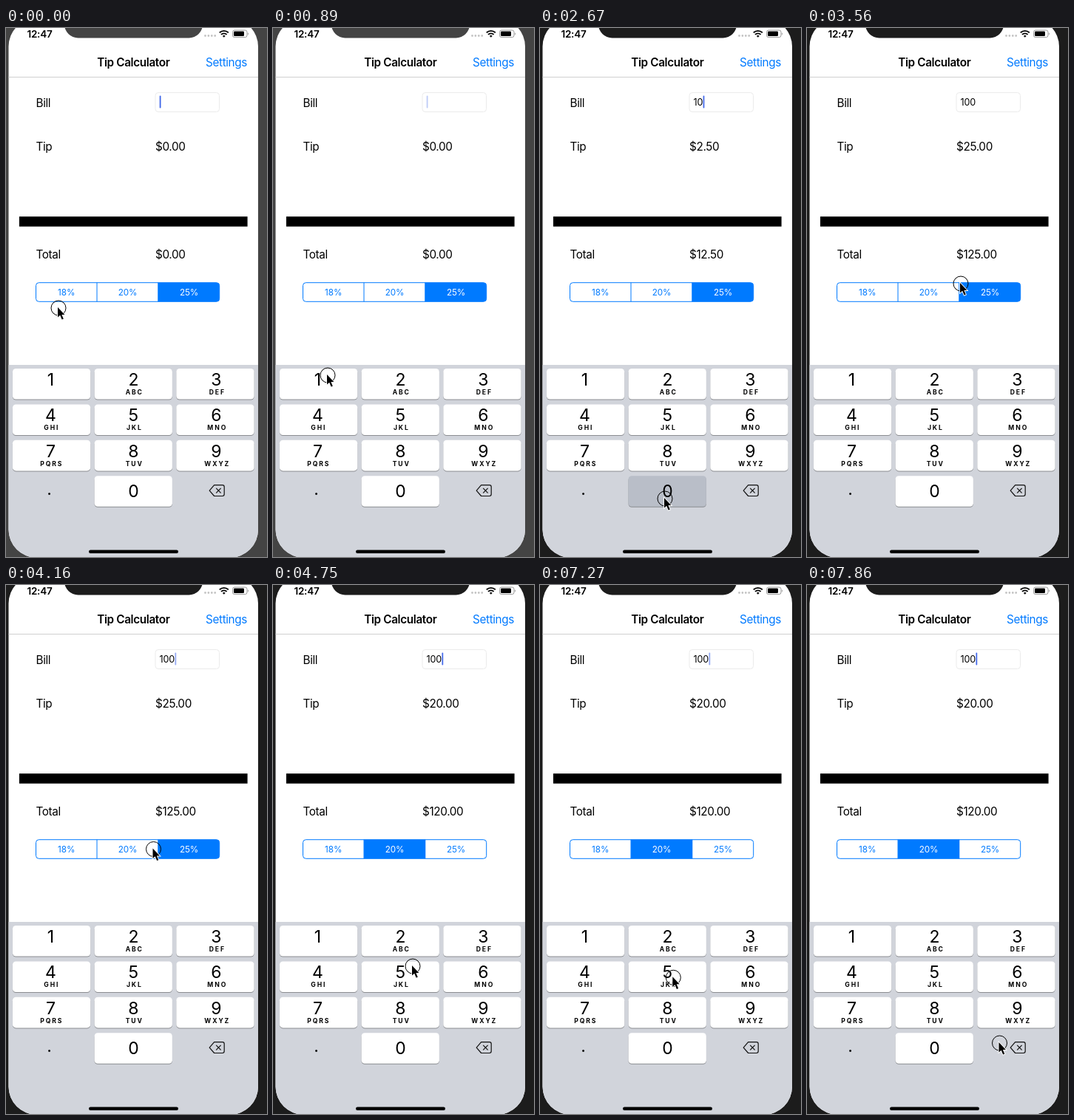
Recreate the animation shown at these times as an HTML page. Size 353 by 716 pixels, loop 8000 ms.

```html
<!DOCTYPE html>
<html lang="en">
<head>
<meta charset="utf-8">
<title>Tip Calculator</title>
<style>
  html, body { margin: 0; width: 100%; height: 100%; overflow: hidden; }
  svg { display: block; width: 353px; height: 716px; }
  text { font: 15.3px Inter, "Liberation Sans", sans-serif; letter-spacing: -.37px; }
  .mid { text-anchor: middle; }
  .bold { font-weight: 600; }
  .clock { font-size: 13.5px; letter-spacing: -.2px; }
  .field { font-size: 12.6px; letter-spacing: -.1px; }
  .seg { font-size: 11.7px; letter-spacing: -.1px; text-anchor: middle; }
  .digit { font-size: 23px; letter-spacing: 0; text-anchor: middle; }
  .abc { font-size: 8.6px; font-weight: 700; letter-spacing: 1.9px; text-anchor: middle; }
</style>
</head>
<body>
<svg viewBox="0 0 353 716">
  <rect id="bezel" width="353" height="716"/>
  <clipPath id="round"><rect x="3.5" y="-13" width="337.5" height="730" rx="38"/></clipPath>
  <g clip-path="url(#round)">
    <rect width="353" height="716" fill="#fff"/>
    <path d="M0 66.5H353" stroke="#cfcfcf"/>
    <rect y="456" width="353" height="260" fill="#d1d4db"/>
  </g>
  <path id="notch" d="M79-13V-5a18.5 18.5 0 0 0 18.5 18.5H247.5a18.5 18.5 0 0 0 18.5-18.5V-13z"/>

  <text class="bold mid clock" x="45.5" y="13">12:47</text>
  <path d="M269.5 10.5h14" stroke="#c4c4c4" stroke-width="2.8" stroke-linecap="round" stroke-dasharray="0 4.4"/>
  <g fill="none" stroke="#000" stroke-width="1.9">
    <path d="M288.8 6.3a8.6 8.6 0 0 1 12 0M291 8.9a5.4 5.4 0 0 1 7.6 0"/>
    <path d="M294.8 12.4l-1.5-1.6a2.2 2.2 0 0 1 3 0z" fill="#000" stroke-width=".6"/>
  </g>
  <rect x="306.5" y="3" width="19.5" height="9.6" rx="2.6" fill="none" stroke="#999"/>
  <rect x="308" y="4.5" width="14" height="6.6" rx="1.3"/>
  <path d="M327.2 6.2a1.8 1.8 0 0 1 0 3.2z" fill="#999"/>

  <text class="bold mid" x="172.3" y="52">Tip Calculator</text>
  <text x="326" y="52" text-anchor="end" fill="#007aff">Settings</text>

  <text x="40.5" y="106.5">Bill</text>
  <text x="40.5" y="166">Tip</text>
  <text x="40.5" y="312">Total</text>
  <rect x="202" y="87.5" width="86.5" height="26" rx="4" fill="#fff" stroke="#ebebeb"/>
  <text id="bill" class="field" x="207.5" y="105"></text>
  <rect id="caret" y="91.5" width="1.8" height="17" rx=".9" fill="#3f66e8"/>
  <text id="tip" x="202" y="166"></text>
  <text id="total" x="202" y="312"></text>
  <rect x="17.9" y="255.2" width="308.7" height="13.5"/>

  <clipPath id="pill"><rect x="40.5" y="344.7" width="248.2" height="25.6" rx="4"/></clipPath>
  <rect id="chosen" y="344" width="83" height="27" fill="#007aff" clip-path="url(#pill)"/>
  <g fill="none" stroke="#007aff">
    <rect x="40.5" y="344.7" width="248.2" height="25.6" rx="4"/>
    <path d="M123 344.7v25.6M205.8 344.7v25.6"/>
  </g>
  <g id="segments"></g>

  <g id="keys"></g>
  <text class="digit" x="58.5" y="632">.</text>
  <path d="M281.6 618.7h11.2a2.4 2.4 0 0 1 2.4 2.4v10a2.4 2.4 0 0 1-2.4 2.4h-11.2l-6.4-7.4zM284.2 622.9l6.4 6.4m0-6.4l-6.4 6.4"
    fill="none" stroke="#111" stroke-width="1.2" stroke-linejoin="round"/>
  <rect x="112" y="706.5" width="121" height="4.5" rx="2.25"/>

  <g id="pointer">
    <circle r="10" fill="none" stroke="#000"/>
    <path d="M-1-1V12.6L2.2 9.8 4.6 15.6 6.8 14.7 4.4 9H8.4z" stroke="#fff" stroke-width="1.8" paint-order="stroke"/>
  </g>
</svg>
<script>
const LOOP = 8000, TICK = 148.4;
const $ = id => document.getElementById(id);
const set = (el, attrs) => {
  for (const name in attrs) el.setAttribute(name, attrs[name]);
};
const make = (parent, tag, attrs, label = '') => {
  const el = document.createElementNS('http://www.w3.org/2000/svg', tag);
  set(el, attrs);
  el.textContent = label;
  return parent.appendChild(el);
};
const clamp = v => Math.min(1, Math.max(0, v));

const rates = [18, 20, 25];
const segments = rates.map((rate, i) =>
  make($('segments'), 'text', { class: 'seg', x: 81.7 + i * 82.9, y: 361.7 }, rate + '%'));

function addKey(digit, col, row, abc) {
  const x = 8.9 + col * 110.7, y = 461 + row * 48.4, mid = 60.4 + col * 112;
  const box = { x, width: 105.3, height: 41.6, rx: 4.5 };
  make($('keys'), 'rect', { ...box, y: y + 1, fill: '#8b8d91' });
  const cap = make($('keys'), 'rect', { ...box, y, fill: '#fff' });
  make($('keys'), 'text', { class: 'digit', x: mid, y: y + (digit ? 23 : 28.3) }, digit);
  make($('keys'), 'text', { class: 'abc', x: mid + 1.4, y: y + 35 }, abc);
  return cap;
}
const letters = ['', 'ABC', 'DEF', 'GHI', 'JKL', 'MNO', 'PQRS', 'TUV', 'WXYZ'];
letters.forEach((abc, i) => addKey(i + 1, i % 3, Math.floor(i / 3), abc));
const zeroKey = addKey(0, 1, 3, '');

// Each move eases the pointer to a place between two ticks.
const moves = [
  { from: 0, to: 3, x: 74, y: 470 },
  { from: 8, to: 12, x: 169, y: 642 },
  { from: 13, to: 16, x: 169, y: 637 },
  { from: 20, to: 24, x: 208, y: 346 },
  { from: 24, to: 26, x: 228, y: 355 },
  { from: 27, to: 29, x: 171, y: 360 },
  { from: 30, to: 32, x: 189, y: 516 },
  { from: 32, to: 35, x: 171, y: 521 },
  { from: 48, to: 53, x: 260.5, y: 620 }
];
function pointerAt(n) {
  let x = 71, y = 379;
  for (const m of moves) {
    const k = clamp((n - m.from) / (m.to - m.from)), ease = k * k * (3 - 2 * k);
    x += (m.x - x) * ease;
    y += (m.y - y) * ease;
  }
  return [x, y];
}

// The caret fades in and out every seven ticks, but stays lit while typing.
function caretAt(n) {
  if (n >= 14 && n < 18) return 1;
  const peak = n < 14 ? .9 : 19.3;
  return clamp(.5 + 1.2 * Math.cos(2 * Math.PI * (n - peak) / 7));
}

function draw(now) {
  // The screen refreshes in discrete steps.
  const n = Math.floor((now % LOOP + 10) / TICK);
  const bill = n < 7 ? '' : n < 15 ? '1' : n < 19 ? '10' : '100';
  const pick = n < 30 ? 2 : 1;
  const tip = bill * rates[pick] / 100;

  $('bill').textContent = bill;
  $('tip').textContent = '$' + tip.toFixed(2);
  $('total').textContent = '$' + (+bill + tip).toFixed(2);
  set($('caret'), { x: 207.7 + $('bill').getComputedTextLength(), opacity: caretAt(n) });

  set($('chosen'), { x: 40.2 + pick * 82.8 });
  segments.forEach((el, i) => set(el, { fill: i === pick ? '#fff' : '#007aff' }));
  set(zeroKey, { fill: n === 18 ? '#b9bec8' : '#fff' });

  const frame = { fill: n < 7 ? '#444' : '#1c1c1c' };
  set($('bezel'), frame);
  set($('notch'), frame);
  set($('pointer'), { transform: `translate(${pointerAt(n)})` });
}

let start;
function loop(now) {
  start ??= now;
  draw(now - start);
  requestAnimationFrame(loop);
}
draw(0);
requestAnimationFrame(loop);
</script>
</body>
</html>
```
